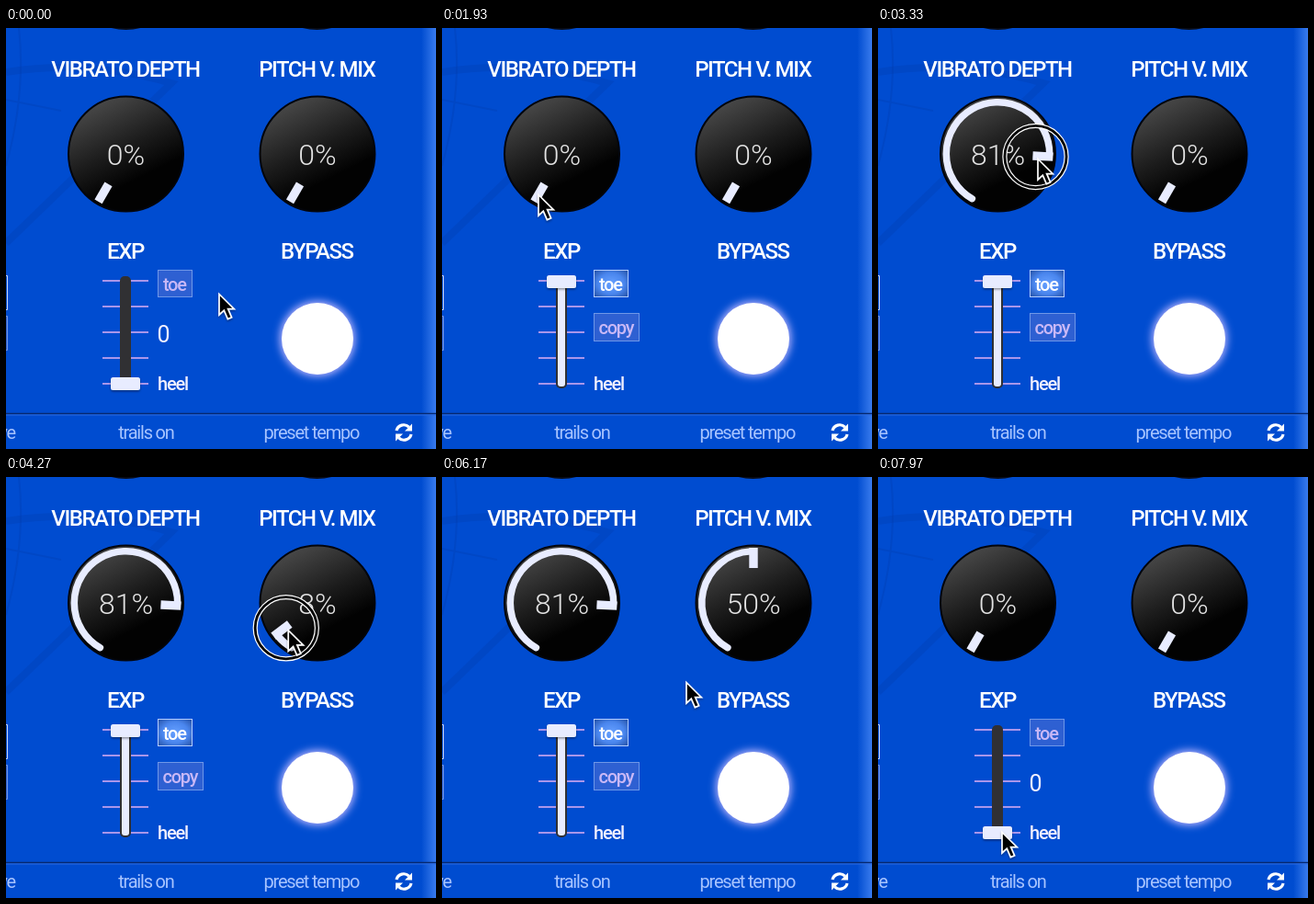
Write an HTML page that moves like this. It is 468 by 458 pixels and loops after 8 s.

```html
<!DOCTYPE html>
<html lang="en">
<head>
<meta charset="utf-8">
<title>Pedal panel</title>
<style>
html, body { margin: 0; width: 100%; height: 100%; overflow: hidden; background: #004cd0; }
svg { display: block; width: 468px; height: 458px; font-family: Roboto, sans-serif; user-select: none; }
.label, .small, .foot { letter-spacing: -.06em; }
.label { font-size: 24px; font-weight: 500; fill: #fff; text-anchor: middle; }
.small { font-size: 20px; font-weight: 500; fill: #f2f0ff; }
.foot { font-size: 20px; fill: #a8c4ff; }
.value { font-size: 32px; font-weight: 300; fill: #e2e2e2; text-anchor: middle; }
</style>
</head>
<body>
<svg viewBox="0 0 468 458">
  <defs>
    <linearGradient id="metal" x1=".25" y1=".05" x2=".7" y2=".95">
      <stop offset="0" stop-color="#484848"/><stop offset=".45" stop-color="#1c1c1c"/><stop offset=".75" stop-color="#020202"/>
    </linearGradient>
    <linearGradient id="edge">
      <stop offset="0" stop-color="#3f80f0" stop-opacity="0"/><stop offset="1" stop-color="#3f80f0" stop-opacity=".9"/>
    </linearGradient>
    <radialGradient id="lit" r=".7">
      <stop offset="0" stop-color="#66a0ff"/><stop offset=".55" stop-color="#4a86ee"/><stop offset="1" stop-color="#2450a4"/>
    </radialGradient>
    <filter id="glow" x="-30%" y="-30%" width="160%" height="160%"><feGaussianBlur stdDeviation="4"/></filter>
    <filter id="drop" x="-50%" y="-50%" width="200%" height="200%">
      <feDropShadow dx="0" dy="1.5" stdDeviation="1.2" flood-opacity=".4"/>
    </filter>
  </defs>

  <rect width="468" height="458" fill="#004cd0"/>
  <g fill="none" stroke="#003ba8" stroke-opacity=".28">
    <path d="M0 48Q90 34 180 60L0 234" stroke-width="8"/>
    <path d="M14 0Q22 70 0 150M0 78L60 90" stroke-width="2"/>
  </g>
  <rect x="452" width="16" height="458" fill="url(#edge)"/>
  <g fill="#080c18"><circle cx="130.5" cy="-61.5" r="63.5"/><circle cx="338.5" cy="-61.5" r="63.5"/></g>

  <text class="label" x="130" y="52.5">VIBRATO DEPTH</text>
  <text class="label" x="338.3" y="52.5">PITCH V. MIX</text>
  <text class="label" x="130" y="250.5">EXP</text>
  <text class="label" x="338.3" y="250.5">BYPASS</text>
  <g id="knobs"></g>

  <path d="M105 275h50M105 303h50M105 331h50M105 359h50M105 387h50" stroke="#a996ea" stroke-width="2"/>
  <rect x="124" y="270" width="12" height="122" rx="5" fill="#303033"/>
  <rect id="fill" x="126" width="8" rx="3" fill="#e8ecff"/>
  <rect id="cap" x="114" width="32" height="14" rx="2.5" fill="#e8ecff" filter="url(#drop)"/>

  <rect id="toeBox" x="165.5" y="263.5" width="37" height="29"/>
  <text id="toeText" class="small" x="183.4" y="286" text-anchor="middle">toe</text>
  <g id="copy">
    <rect x="165.5" y="310.5" width="49" height="30" fill="#2e60d2" stroke="#6f97e8"/>
    <text class="small" x="189.4" y="333" text-anchor="middle" style="fill:#c9b8f6">copy</text>
  </g>
  <text id="zero" x="164.5" y="342" font-size="25" fill="#f2f0ff">0</text>
  <text class="small" x="165" y="394">heel</text>

  <circle cx="339" cy="338" r="41" fill="#b9b4ff" filter="url(#glow)"/>
  <circle cx="339" cy="338" r="39" fill="#fff"/>

  <path d="M0 269.5H1.5V306.5H0" fill="none" stroke="#c8d6f6"/>
  <path d="M0 313.5H1.5V350.5H0" fill="#2e60d2" stroke="#6f97e8"/>
  <path d="M0 419.5H468" stroke="#06286e" stroke-width="1.5"/>
  <path d="M0 421H468" stroke="#2d6be0" stroke-width="1"/>
  <text class="foot" x="10" y="447" text-anchor="end">ve</text>
  <text class="foot" x="152.4" y="447" text-anchor="middle">trails on</text>
  <text class="foot" x="332.4" y="447" text-anchor="middle">preset tempo</text>
  <g fill="none" stroke="#fff" stroke-width="3.2">
    <path d="M425 438A8 8 0 0 1 438.5 434.2"/>
    <path d="M442 430.5V438.5H434Z" fill="#fff" stroke="none"/>
    <g transform="rotate(180 433 440)">
      <path d="M425 438A8 8 0 0 1 438.5 434.2"/>
      <path d="M442 430.5V438.5H434Z" fill="#fff" stroke="none"/>
    </g>
  </g>

  <g id="ring" fill="none">
    <circle r="33.6" stroke="#fff" stroke-width="5.2"/>
    <circle r="33.6" stroke="#050505" stroke-width="2.8"/>
  </g>
  <g id="arrow" filter="url(#drop)">
    <path d="M1 1.5V24L6.3 19.2L10.4 28.6L14.6 26.8L10.6 17.6H17.3Z" fill="#000" stroke="#fff" stroke-width="1.7"/>
  </g>
  <g id="hand" filter="url(#drop)">
    <path d="M-2.2 2.5C-2.2 .3 1.8 .3 2.2 2.5L3.6 9.5C4.4 8 7.2 8.3 7.6 10.2C8.8 9 11 9.4 11.2 11.2C12.8 10.4 14.4 11.5 14.4 13.4C14.6 17 13.6 19 12.6 21.2V24.5H2.8C1.5 20.5-2 18.5-5.2 15C-6.8 12.5-4.2 10.9-2.2 12.6L0 14.4Z" fill="#fff" stroke="#000" stroke-width="1.4" stroke-linejoin="round"/>
    <path d="M4.2 15.5V21M7.4 15.5V21M10.4 15.5V21" stroke="#000" stroke-width="1.2"/>
  </g>
</svg>
<script>
const LOOP = 8000;
const $ = id => document.getElementById(id);
const set = (el, attrs) => { for (const k in attrs) el.setAttribute(k, attrs[k]); };
const show = (el, on) => set(el, { visibility: on ? 'visible' : 'hidden' });

// Eased value at time t from rows of [time, a, b, ...].
function track(rows, t, col = 1) {
  if (t <= rows[0][0]) return rows[0][col];
  for (let i = 1; i < rows.length; i++) {
    const a = rows[i - 1], b = rows[i];
    if (t <= b[0]) {
      const u = (t - a[0]) / (b[0] - a[0]);
      return a[col] + (b[col] - a[col]) * u * u * (3 - 2 * u);
    }
  }
  return rows[rows.length - 1][col];
}

const pointer = [
  [30, 231, 288], [530, 193, 289], [1370, 193, 289], [1900, 104, 180], [2050, 104, 180],
  [2300, 96, 155], [2600, 133, 134], [3000, 173, 138], [3330, 173, 141], [3400, 173, 141],
  [3830, 301, 178], [4050, 301, 178], [4830, 328, 113], [5250, 354, 85], [5560, 347, 85],
  [6170, 265, 222], [6370, 231, 250], [6670, 193, 289], [7470, 193, 289], [7970, 134, 385]
];
const slide = [[700, 0], [1000, 1], [6950, 1], [7200, 0]];
const vibrato = [[2050, 0], [2500, 19], [2600, 19], [3150, 81], [6950, 81], [7200, 0]];
const pitch = [[4050, 0], [4830, 39], [5300, 50], [6950, 50], [7200, 0]];
const presses = [[670, 960], [2000, 3400], [4000, 5560], [6930, 7170]];

function polar(r, deg) {
  const a = deg * Math.PI / 180;
  return `${r * Math.sin(a)} ${-r * Math.cos(a)}`;
}

function makeKnob(x) {
  const g = document.createElementNS('http://www.w3.org/2000/svg', 'g');
  set(g, { transform: `translate(${x} 137)` });
  g.innerHTML = `<circle r="62.5" fill="url(#metal)" stroke="#03050c" stroke-width="2"/>
    <text class="value" y="12"></text>
    <path class="arc" fill="none" stroke="#e8ecff" stroke-width="7.5" stroke-linecap="round"/>
    <rect x="-4.7" y="-60" width="9.4" height="22" fill="#e8ecff"/>`;
  $('knobs').append(g);
  const [text, arc, mark] = ['text', '.arc', 'rect'].map(q => g.querySelector(q));
  return value => {
    const end = -150 + value * 3;
    text.textContent = Math.round(value) + '%';
    set(mark, { transform: `rotate(${end})` });
    show(arc, value > 2);
    set(arc, { d: `M${polar(56.2, -150)}A56.2 56.2 0 ${value > 60 ? 1 : 0} 1 ${polar(56.2, Math.max(-150, end - 3))}` });
  };
}

const drawVibrato = makeKnob(130.5), drawPitch = makeKnob(339);

function draw(t) {
  const x = track(pointer, t), y = track(pointer, t, 2);
  const over = x > 165 && x < 203 && y > 263 && y < 293;
  const active = t >= 700 && t < 6950;
  const s = track(slide, t), top = 380 - 111 * s;

  drawVibrato(track(vibrato, t));
  drawPitch(track(pitch, t));

  set($('cap'), { y: top });
  set($('fill'), { y: top + 7, height: Math.max(0, 383 - top) });
  show($('fill'), s > 0.02);
  show($('copy'), active);
  show($('zero'), !active);

  set($('toeBox'), {
    fill: active ? 'url(#lit)' : over ? '#4074e0' : '#2e60d2',
    stroke: active || over ? '#b4ccff' : '#6f97e8'
  });
  $('toeText').style.fill = active || over ? '#fff' : '#c9b8f6';

  const at = `translate(${x} ${y})`;
  set($('arrow'), { transform: at });
  set($('hand'), { transform: at });
  show($('arrow'), !over);
  show($('hand'), over);
  set($('ring'), { transform: `translate(${x + (over ? 5 : -1.5)} ${y - 1})` });
  show($('ring'), presses.some(([a, b]) => t >= a && t < b));
}

const start = performance.now();
function tick() {
  draw((performance.now() - start) % LOOP);
  requestAnimationFrame(tick);
}
tick();
</script>
</body>
</html>
```
